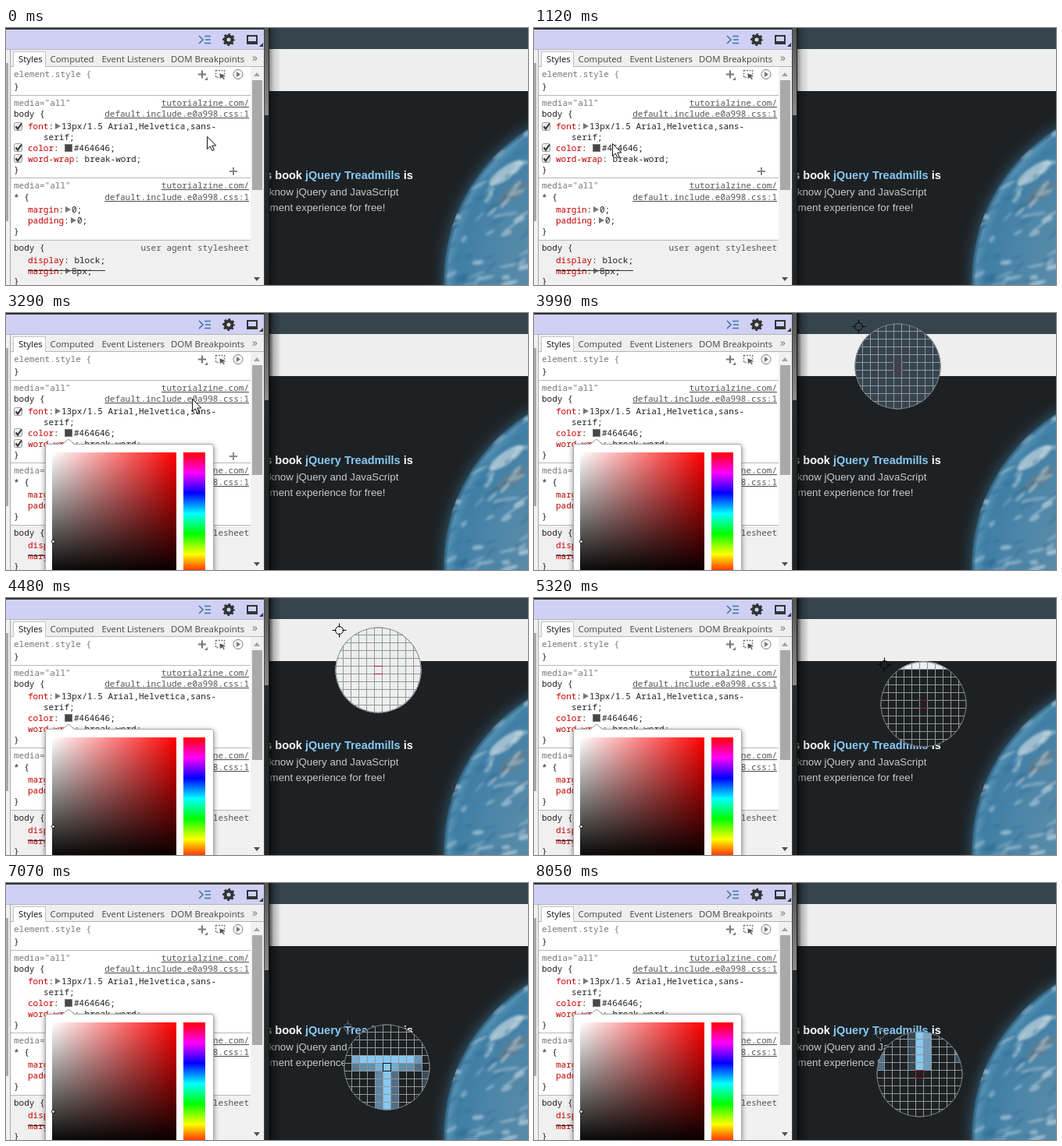
These frames come from a looping animation (668 by 330 pixels, 8260 ms). An HTML page:

```html
<!DOCTYPE html>
<html lang="en">
<head>
<meta charset="utf-8">
<title>Color picker</title>
<style>
html, body { margin: 0; width: 100%; height: 100%; overflow: hidden; background: #1d2124; }
svg { display: block; }
text { white-space: pre; font-kerning: none; }
.code text { font: 11px "Noto Sans Mono", monospace; fill: #222; }
.code .p { fill: #c80000; }
.code .g { fill: #777; }
.code .l { fill: #555; text-anchor: end; }
.code .u { text-decoration: underline; }
.tabs text { font: 11.4px "Open Sans", sans-serif; fill: #444; }
.head { font: bold 14.5px "Liberation Sans", Arial, sans-serif; fill: #fff; }
.para { font: 13.3px "Liberation Sans", Arial, sans-serif; fill: #c6c9ca; }
.crisp { shape-rendering: crispEdges; }
</style>
</head>
<body>
<svg id="stage" width="668" height="330" viewBox="0 0 668 330">
  <defs>
    <radialGradient id="sea" gradientUnits="userSpaceOnUse" cx="791" cy="325" r="231">
      <stop offset=".45" stop-color="#5c8ca9"/>
      <stop offset=".75" stop-color="#4d86a8"/>
      <stop offset=".93" stop-color="#3f7ea5"/>
      <stop offset=".975" stop-color="#5390b3"/>
      <stop offset="1" stop-color="#2c5672"/>
    </radialGradient>
    <radialGradient id="halo" gradientUnits="userSpaceOnUse" cx="791" cy="325" r="252">
      <stop offset=".91" stop-color="#2f566e" stop-opacity=".7"/>
      <stop offset=".95" stop-color="#263a48" stop-opacity=".35"/>
      <stop offset="1" stop-color="#1d2124" stop-opacity="0"/>
    </radialGradient>
    <linearGradient id="edge">
      <stop offset="0" stop-color="#000" stop-opacity=".7"/>
      <stop offset=".35" stop-color="#000" stop-opacity=".25"/>
      <stop offset="1" stop-color="#000" stop-opacity="0"/>
    </linearGradient>
    <linearGradient id="frame" x2="0" y2="1">
      <stop offset="0" stop-color="#555"/>
      <stop offset=".34" stop-color="#8a8a8a"/>
      <stop offset=".34" stop-color="#2a2b2c"/>
      <stop offset="1" stop-color="#222325"/>
    </linearGradient>
    <linearGradient id="hues" x2="0" y2="1"></linearGradient>
    <linearGradient id="sat">
      <stop offset="0" stop-color="#fff"/>
      <stop offset="1" stop-color="#f00"/>
    </linearGradient>
    <linearGradient id="val" x2="0" y2="1">
      <stop offset="0" stop-color="#000" stop-opacity="0"/>
      <stop offset="1" stop-color="#000"/>
    </linearGradient>
    <linearGradient id="box" x2="0" y2="1">
      <stop offset="0" stop-color="#f4f4f4"/>
      <stop offset="1" stop-color="#dcdcdc"/>
    </linearGradient>
    <filter id="soft"><feGaussianBlur stdDeviation="1.600"/></filter>
    <filter id="drop" x="-10%" y="-10%" width="120%" height="120%"><feGaussianBlur stdDeviation="3.5"/></filter>
    <clipPath id="globe"><circle cx="791" cy="325" r="231"/></clipPath>
    <clipPath id="lens"><circle cx="55.5" cy="55.5" r="55"/></clipPath>
    <clipPath id="panel"><rect width="331" height="330"/></clipPath>
  </defs>

  <!-- web page -->
  <rect width="668" height="330" fill="#1d2124"/>
  <rect width="668" height="27" fill="#35444d"/>
  <rect y="27" width="668" height="54" fill="#eee"/>
  <path d="M480 81H668V330H480z" fill="url(#halo)"/>
  <g clip-path="url(#globe)">
    <circle cx="791" cy="325" r="231" fill="url(#sea)"/>
    <g id="sky" filter="url(#soft)"></g>
  </g>
  <g id="copy"></g>

  <!-- inspector -->
  <rect x="331" width="6" height="330" fill="url(#frame)"/>
  <path class="crisp" d="M336.500 0V330" stroke="#1a1b1c"/>
  <rect id="shade" x="337" width="15" height="330" fill="url(#edge)"/>
  <g clip-path="url(#panel)">
    <rect width="331" height="330" fill="#fff"/>
    <rect width="331" height="28" fill="#d0d0f4"/>
    <path class="crisp" d="M0 1H331" stroke="#333" stroke-width="2"/>
    <rect y="27" width="331" height="23" fill="#efefef"/>
    <path class="crisp" d="M0 27.5H331M6 49.5H331" stroke="#b4b4bc"/>
    <rect y="28" width="5" height="302" fill="#f1f1f1"/>
    <rect y="45" width="3" height="203" fill="#a9a9a9"/>
    <path class="crisp" d="M5.5 28V330" stroke="#a8a8a8"/>
    <g fill="none" stroke="#3f76a6" stroke-width="1.6">
      <path d="M247 10l5 5-5 5M254 10.500h8M255 15h7M254 19.500h8"/>
    </g>
    <g fill="none" stroke="#333">
      <circle cx="285" cy="15" r="4.500" stroke-width="4"/>
      <circle cx="285" cy="15" r="6.500" stroke-width="3" stroke-dasharray="2.550" stroke-dashoffset="1.275"/>
    </g>
    <path d="M308 9h14v12h-14zM310 11v6h10v-6z" fill="#333" fill-rule="evenodd"/>
    <path d="M324 24l5-5v5z" fill="#333"/>
    <g class="tabs">
      <path class="crisp" d="M9.500 50V30.500H50.500V50" fill="#fff" stroke="#c4c4c4"/>
      <text x="16" y="44" style="fill:#111">Styles</text>
      <text x="56.500" y="44">Computed</text>
      <text x="122.500" y="44">Event Listeners</text>
      <text x="211" y="44">DOM Breakpoints</text>
      <text x="315" y="43" style="font-size:14px;fill:#777">»</text>
    </g>
    <rect x="6" y="273" width="307" height="57" fill="#f0f0f0"/>
    <path class="crisp" d="M6 86.500H313M6 192.500H313M6 272.500H313" stroke="#b8b8b8"/>
    <rect x="313" y="50" width="17" height="280" fill="#f1f1f1"/>
    <rect x="315" y="67" width="13" height="141" fill="#a9a9a9"/>
    <path d="M317 62l4-5 4 5z" fill="#a3a3a3"/>
    <path d="M317 320l4 5 4-5z" fill="#505050"/>
    <path class="crisp" d="M330.500 0V330" stroke="#444"/>

    <g stroke="#777" fill="none">
      <path d="M246 59.500h10M251 54.500v10" stroke-width="2"/>
      <path d="M254 67l4-4v4z" fill="#777" stroke="none"/>
      <path d="M268.500 54.500h11v9h-11z" stroke-width="1.500" stroke-dasharray="2 1.500"/>
      <path d="M273 58l8 3-3 1.500 2 3-1.500 1-2-3-2.500 2z" fill="#555" stroke="#fff" stroke-width=".5"/>
      <circle cx="297" cy="59.500" r="6"/>
      <path d="M295 56v7l5-3.500z" fill="#777" stroke="none"/>
    </g>
    <g class="code" id="rules"></g>
    <rect class="crisp" x="75.500" y="149.500" width="9" height="9" fill="#464646" stroke="#777"/>
    <path class="crisp" d="M28 311.500H127" stroke="#333"/>
    <g id="hover"><path d="M286 184h10M291 179v10" stroke="#8a8a8a" stroke-width="2"/></g>

    <g id="popup">
      <rect x="50" y="170" width="216" height="180" rx="3" fill="#000" opacity=".45" filter="url(#drop)"/>
      <rect x="50.500" y="168.500" width="215" height="180" rx="3" fill="#fff" stroke="#aaa"/>
      <path d="M72 169l8-7 8 7" fill="#fff" stroke="#999"/>
      <rect x="59" y="179" width="159" height="157" fill="url(#sat)"/>
      <rect x="59" y="179" width="159" height="157" fill="url(#val)"/>
      <rect x="227" y="179" width="28" height="157" fill="url(#hues)"/>
      <circle cx="60.500" cy="293.500" r="2" fill="#fff" stroke="#000"/>
    </g>
  </g>

  <!-- pointers -->
  <path id="arrow" d="M.5 .5V16.500L4.200 13 6.800 18.500 9.300 17.400 6.800 12H11.800z" fill="#fff" stroke="#111"/>
  <g id="sight" fill="none"><circle r="5"/><path d="M-9 0h5M4 0h5M0-9v5M0 4v5"/></g>
  <g id="loupe">
    <g clip-path="url(#lens)">
      <g id="cells" class="crisp"></g>
      <path id="grid" class="crisp" stroke="#90979a" fill="none"/>
      <path id="target" class="crisp" fill="none"/>
    </g>
    <circle cx="55.500" cy="55.500" r="54.500" fill="none" stroke="#7c8386"/>
  </g>
</svg>
<script>
const LOOP = 8260, STEP = 70, N = 11, CELL = 10;
const $ = id => document.getElementById(id);

function add(parent, name, attrs, text) {
  const el = document.createElementNS('http://www.w3.org/2000/svg', name);
  for (const k in attrs) el.setAttribute(k, attrs[k]);
  if (text) el.textContent = text;
  parent.appendChild(el);
  return el;
}
const show = (el, on) => el.setAttribute('visibility', on ? 'visible' : 'hidden');
const move = (el, x, y) => el.setAttribute('transform', `translate(${x} ${y})`);

// Style rules: x, baseline, text, class
[
  [10, 63, 'element.style {', 'g'], [10, 79, '}'],
  [10, 100, 'media="all"', 'g'], [311, 100, 'tutorialzine.com/', 'l u'],
  [10, 114, 'body {'], [311, 114, 'default.include.e0a998.css:1', 'l u'],
  [28, 130, 'font', 'p'], [54.4, 130, ':'], [71, 130, '13px/1.5 Arial,Helvetica,sans-'],
  [48, 144, 'serif;'],
  [28, 158, 'color', 'p'], [61, 158, ':'], [87, 158, '#464646;'],
  [28, 172, 'word-wrap', 'p'], [87.4, 172, ': break-word;'], [10, 186, '}'],
  [10, 206, 'media="all"', 'g'], [311, 206, 'tutorialzine.com/', 'l u'],
  [10, 221, '* {'], [311, 221, 'default.include.e0a998.css:1', 'l u'],
  [28, 237, 'margin', 'p'], [67.6, 237, ':'], [84, 237, '0;'],
  [28, 251, 'padding', 'p'], [74.2, 251, ':'], [91, 251, '0;'], [10, 265, '}'],
  [10, 286, 'body {'], [311, 286, 'user agent stylesheet', 'l'],
  [28, 302, 'display', 'p'], [74.2, 302, ': block;'],
  [28, 316, 'margin', 'p'], [67.6, 316, ':'], [84, 316, '8px;'], [10, 329, '}']
].forEach(([x, y, s, c = '']) => add($('rules'), 'text', { x, y, class: c }, s));
for (const [x, y] of [[63, 126], [76, 233], [83, 247], [76, 312]])
  add($('rules'), 'path', { d: `M${x} ${y - 4}l7 4-7 4z`, fill: '#777' });

for (const y of [121, 148, 162]) {
  add($('hover'), 'rect', { x: 10.5, y: y + .5, width: 10, height: 10, rx: 2, fill: 'url(#box)', stroke: '#999' });
  add($('hover'), 'path', { d: `M12.500 ${y + 5.5}l2.500 3 5-7`, fill: 'none', stroke: '#333', 'stroke-width': 2 });
}

for (let i = 0; i <= 6; i++)
  add($('hues'), 'stop', { offset: i / 6, 'stop-color': `hsl(${360 - i * 60}, 100%, 50%)` });

// Seeded streaks of cloud over the globe, with one strip of land
let seed = 11;
const rnd = () => (seed = seed * 16807 % 2147483647) / 2147483647;
function streak(cx, cy, rx, ry, turn, fill, opacity) {
  add($('sky'), 'ellipse', { cx, cy, rx, ry, fill, opacity, transform: `rotate(${turn} ${cx} ${cy})` });
}
streak(648, 212, 22, 8, -40, '#6f7a7d', .6);
streak(640, 186, 26, 8, -35, '#dce6ea', .6);
for (let i = 0; i < 70; i++) {
  const y = 135 + rnd() * 195, x = 668 - rnd() * 98;
  const light = i % 3;
  streak(x, y, 4 + rnd() * 10, 1 + rnd() * 2.5, -55 + rnd() * 50, light ? '#dbe8ef' : '#2c668c', .25 + rnd() * .3);
}

// Page copy, drawn as text and also on a hidden canvas for the loupe
const FAMILY = '"Liberation Sans", Arial, sans-serif';
const copy = [
  { x: 332.2, y: 194, cls: 'head', font: 'bold 14.5px ' + FAMILY,
    parts: [['s book ', '#fff'], ['jQuery Treadmills', '#88c8f2'], [' is', '#fff']] },
  { x: 336.8, y: 215, cls: 'para', font: '13.3px ' + FAMILY, parts: [['know jQuery and JavaScript', '#c6c9ca']] },
  { x: 337.6, y: 235, cls: 'para', font: '13.3px ' + FAMILY, parts: [['ment experience for free!', '#c6c9ca']] }
];
const cv = document.createElement('canvas');
cv.width = 668;
cv.height = 330;
const pen = cv.getContext('2d', { willReadFrequently: true });
[['#1d2124', 0, 330], ['#35444d', 0, 27], ['#eeeeee', 27, 54]].forEach(([c, y, h]) => {
  pen.fillStyle = c;
  pen.fillRect(0, y, 668, h);
});
for (const { x, y, cls, font, parts } of copy) {
  const line = add($('copy'), 'text', { x, y, class: cls });
  let left = x;
  pen.font = font;
  pen.fontKerning = 'none';
  for (const [s, fill] of parts) {
    add(line, 'tspan', { style: 'fill:' + fill }, s);
    pen.fillStyle = fill;
    pen.fillText(s, left, y);
    left += pen.measureText(s).width;
  }
}

const cells = [];
for (let i = 0; i < N * N; i++)
  cells.push(add($('cells'), 'rect', { x: i % N * CELL, y: Math.floor(i / N) * CELL, width: CELL + 1, height: CELL + 1 }));
let lines = '';
for (let i = 0; i <= N; i++) lines += `M${i * CELL + .5} 0V111M0 ${i * CELL + .5}H111`;
$('grid').setAttribute('d', lines);

// Pointer path: time, x, y
const path = [
  [0, 257, 139], [420, 257, 139], [700, 215, 136], [980, 135, 141], [1190, 82, 152], [1330, 78, 153],
  [2310, 78, 153], [2520, 95, 176], [2730, 120, 194], [2870, 120, 194], [3150, 175, 150], [3430, 300, 70],
  [3710, 402, 17], [3780, 404, 11], [3850, 408, 11], [3920, 408, 11], [3990, 415, 17], [4200, 423, 28],
  [4480, 426, 41], [4830, 426, 41], [5040, 437, 58], [5320, 448, 85], [5670, 451, 104], [6020, 449, 130],
  [6300, 441, 157], [6510, 438, 170], [7070, 437, 185], [7350, 438, 190], [7490, 441, 192],
  [7840, 441, 192], [8050, 443, 194], [LOOP, 443, 194]
];
function pointer(t) {
  const i = path.findIndex(p => p[0] > t);
  const [t0, x0, y0] = path[i - 1], [t1, x1, y1] = path[i];
  const k = (t - t0) / (t1 - t0);
  return [Math.round(x0 + (x1 - x0) * k), Math.round(y0 + (y1 - y0) * k)];
}

const BARS = 'M50 50.500H61M50 60.500H61', SQUARE = 'M50.500 50.500h10v10h-10z';
function targetStyle(t) {
  if (t < 5740) return [BARS, '#b8161b'];
  if (t < 6580) return [SQUARE, '#5a2a30'];
  return [SQUARE, t < 7420 ? '#111111' : '#a3272c'];
}

function drawLoupe(x, y, t) {
  move($('loupe'), x - 5, y - 4);
  const px = pen.getImageData(x - 5, y - 5, N, N).data;
  cells.forEach((c, i) => c.setAttribute('fill', `rgb(${px[i * 4]},${px[i * 4 + 1]},${px[i * 4 + 2]})`));
  const [d, stroke] = targetStyle(t);
  $('target').setAttribute('d', d);
  $('target').setAttribute('stroke', stroke);
}

function render(ms) {
  const t = Math.floor(ms % LOOP / STEP) * STEP;
  const [x, y] = pointer(t);
  const open = t >= 1960;
  const onPage = x > 337;
  const onPopup = open && x >= 50 && x <= 266 && y >= 168;
  show($('popup'), open);
  show($('hover'), !onPage && !onPopup && x < 313 && y > 86 && y < 192);
  $('shade').setAttribute('opacity', t < 1540 ? .6 : 1);
  show($('arrow'), !onPage);
  show($('sight'), onPage);
  show($('loupe'), onPage);
  move($('arrow'), x, y);
  if (onPage) {
    move($('sight'), x + .5, y + .5);
    $('sight').setAttribute('stroke', t < 5740 ? '#060708' : '#62676a');
    drawLoupe(x, y, t);
  }
}

const start = performance.now();
function tick() {
  render(performance.now() - start);
  requestAnimationFrame(tick);
}
tick();
</script>
</body>
</html>
```
